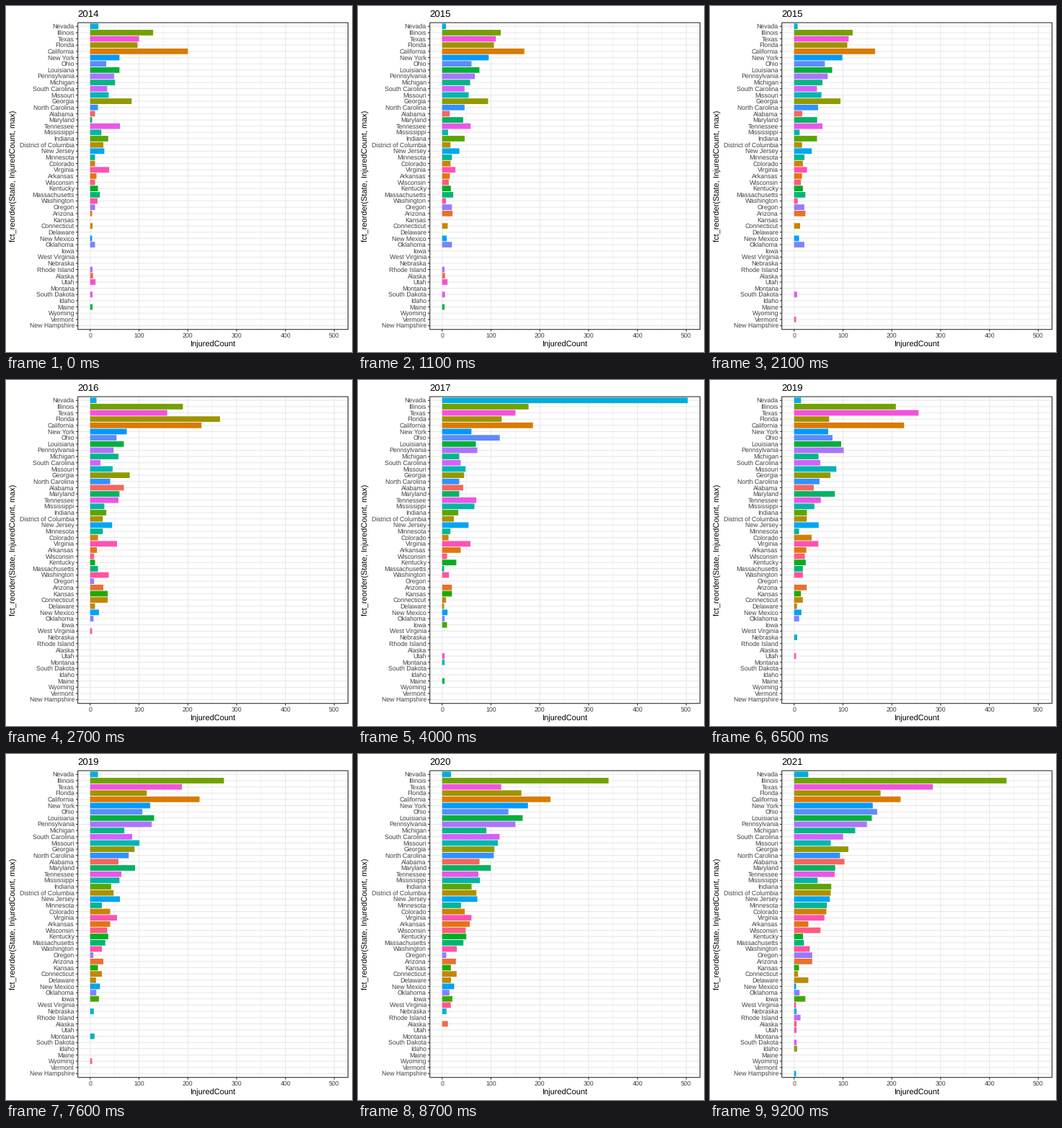
A matplotlib script that plays this animation: 480 by 480 pixels, repeating every 10000 ms.

```python
import numpy as np
import matplotlib.pyplot as plt
from matplotlib.animation import FuncAnimation
from matplotlib.patches import Rectangle

plt.rcParams.update({"font.family": "Liberation Sans", "text.hinting": "none"})

SIZE, DPI = 480, 72
FRAMES, STEP_MS = 100, 100
LEFT, RIGHT, TOP, BOTTOM = 99.7, 474.5, 23.1, 448.7
FIRST_YEAR = 2014
# (first changing tick, number of steps) for each move to the next year
MOVES = [(7, 7), (21, 7), (35, 6), (48, 6), (61, 6), (74, 6), (87, 6)]
GRID, INK, LABEL = "#e8e8e8", "#2b2b2b", "#404040"

names, rows = [], []


def state(name, *counts):
    """Add one bar: injured counts for 2014 to 2021, 0 where no data."""
    names.append(name)
    rows.append(counts)


state("Nevada", 17, 7, 13, 503, 19, 14, 18, 29)
state("Illinois", 129, 119, 190, 177, 168, 209, 339, 435)
state("Texas", 100, 111, 158, 150, 86, 258, 118, 284)
state("Florida", 97, 107, 266, 122, 161, 70, 162, 177)
state("California", 200, 165, 228, 186, 181, 226, 222, 218)
state("New York", 60, 99, 75, 60, 58, 70, 176, 161)
state("Ohio", 33, 63, 54, 118, 54, 79, 135, 170)
state("Louisiana", 60, 78, 69, 69, 64, 97, 165, 159)
state("Pennsylvania", 49, 69, 48, 72, 85, 102, 150, 149)
state("Michigan", 51, 58, 58, 35, 38, 50, 90, 125)
state("South Carolina", 35, 47, 21, 38, 24, 54, 118, 100)
state("Missouri", 38, 56, 46, 48, 57, 87, 115, 75)
state("Georgia", 85, 95, 81, 45, 36, 75, 107, 111)
state("North Carolina", 16, 49, 41, 35, 46, 52, 106, 94)
state("Alabama", 10, 16, 69, 43, 48, 40, 76, 103)
state("Maryland", 4, 47, 60, 35, 43, 84, 100, 84)
state("Tennessee", 61, 58, 58, 70, 82, 54, 74, 83)
state("Mississippi", 23, 11, 29, 66, 13, 42, 78, 48)
state("Indiana", 37, 47, 33, 33, 24, 26, 60, 76)
state("District of Columbia", 27, 16, 26, 24, 17, 26, 70, 75)
state("New Jersey", 29, 36, 45, 54, 58, 50, 72, 73)
state("Minnesota", 10, 21, 26, 17, 14, 10, 38, 67)
state("Colorado", 10, 18, 16, 13, 30, 36, 46, 66)
state("Virginia", 39, 26, 55, 58, 20, 50, 60, 62)
state("Arkansas", 13, 16, 14, 38, 20, 25, 57, 29)
state("Wisconsin", 10, 14, 8, 10, 17, 22, 48, 54)
state("Kentucky", 16, 18, 10, 29, 13, 24, 50, 18)
state("Massachusetts", 20, 23, 16, 4, 4, 18, 44, 20)
state("Washington", 15, 7, 38, 14, 13, 18, 30, 32)
state("Oregon", 10, 21, 8, 0, 0, 5, 8, 37)
state("Arizona", 4, 23, 27, 20, 10, 26, 28, 37)
state("Kansas", 0, 0, 36, 20, 13, 14, 18, 10)
state("Connecticut", 5, 12, 36, 8, 8, 18, 30, 8)
state("Delaware", 0, 0, 10, 4, 5, 6, 18, 29)
state("New Mexico", 4, 10, 18, 11, 10, 15, 25, 4)
state("Oklahoma", 10, 21, 7, 5, 22, 10, 15, 11)
state("Iowa", 0, 0, 0, 10, 0, 15, 21, 23)
state("West Virginia", 0, 0, 4, 0, 0, 0, 18, 4)
state("Nebraska", 0, 0, 0, 0, 17, 6, 9, 5)
state("Rhode Island", 5, 0, 0, 0, 0, 0, 0, 13)
state("Alaska", 6, 0, 0, 0, 0, 0, 12, 5)
state("Utah", 11, 0, 0, 5, 4, 0, 0, 5)
state("Montana", 0, 0, 0, 5, 0, 9, 0, 0)
state("South Dakota", 5, 6, 0, 0, 0, 0, 0, 5)
state("Idaho", 0, 0, 0, 0, 0, 0, 0, 6)
state("Maine", 5, 0, 0, 5, 0, 0, 0, 0)
state("Wyoming", 0, 0, 0, 0, 0, 4, 0, 0)
state("Vermont", 0, 4, 0, 0, 0, 0, 0, 0)
state("New Hampshire", 0, 0, 0, 0, 0, 0, 0, 4)

data = np.array(rows, float).T
count = len(names)
scale = (RIGHT - LEFT) / (1.1 * data.max())
zero = LEFT + 0.05 * data.max() * scale
pitch = (BOTTOM - TOP) / (count + 0.2)
row_y = TOP + pitch * (0.6 + np.arange(count))


def hue(deg, chroma=100, light=65):
    """Polar LUV colour as sRGB, slightly deepened."""
    h = np.radians(deg)
    u = chroma * np.cos(h) / (13 * light) + 0.1978
    v = chroma * np.sin(h) / (13 * light) + 0.4683
    y = ((light + 16) / 116) ** 3
    x = y * 9 * u / (4 * v)
    z = y * (12 - 3 * u - 20 * v) / (4 * v)
    lin = np.array([3.2406 * x - 1.5372 * y - 0.4986 * z,
                    -0.9689 * x + 1.8758 * y + 0.0415 * z,
                    0.0557 * x - 0.2040 * y + 1.0570 * z]).clip(0, 1)
    rgb = np.where(lin > 0.0031308, 1.055 * lin ** (1 / 2.4) - 0.055, 12.92 * lin)
    return tuple(rgb.clip(0, 1) ** 1.2)


def ease(p):
    return 4 * p ** 3 if p < 0.5 else 1 - 4 * (1 - p) ** 3


def pose(tick):
    """Year and bar values at a tick."""
    index = 0
    for i, (start, steps) in enumerate(MOVES):
        k = tick - start + 1
        if k >= steps:
            index = i + 1
        elif k > 0:
            a, b = data[i], data[i + 1]
            mixed = a + (b - a) * ease(k / steps)
            # bars without a partner pop in or out when the move ends
            values = np.where((a > 0) & (b > 0), mixed, a)
            return FIRST_YEAR + i + (2 * k > steps), values
    return FIRST_YEAR + index, data[index]


fig = plt.figure(figsize=(SIZE / DPI, SIZE / DPI), dpi=DPI, facecolor="white")
ax = fig.add_axes([0, 0, 1, 1])
ax.set(xlim=(0, SIZE), ylim=(SIZE, 0))
ax.axis("off")


def line(xs, ys, color, width=1.07, z=1):
    ax.plot(xs, ys, color=color, lw=width, zorder=z, snap=False,
            solid_capstyle="butt")


for n in range(50, 500, 100):
    line([zero + n * scale] * 2, [TOP, BOTTOM], GRID, 0.53)
for n in range(0, 501, 100):
    x = zero + n * scale
    line([x, x], [TOP, BOTTOM], GRID)
    line([x, x], [BOTTOM, BOTTOM + 2.75], INK)
    ax.text(x, 460, str(n), size=8.8, color=LABEL, ha="center", va="baseline")

order = sorted(names)
bars = []
for name, y in zip(names, row_y):
    line([LEFT, RIGHT], [y, y], GRID)
    line([LEFT - 2.75, LEFT], [y, y], INK)
    ax.text(94.9, y + 3.1, name, size=8.8, color=LABEL, ha="right", va="baseline")
    bar = Rectangle((zero, y - 0.45 * pitch), 0, 0.9 * pitch, lw=0, zorder=2,
                    color=hue(15 + 360 * order.index(name) / count), snap=False)
    bars.append(ax.add_patch(bar))

ax.add_patch(Rectangle((LEFT, TOP), RIGHT - LEFT, BOTTOM - TOP, fill=False,
                       ec=INK, lw=1.07, zorder=3, snap=False))
ax.text((LEFT + RIGHT) / 2, 473, "InjuredCount", size=11, ha="center", va="baseline")
ax.text(13.6, (TOP + BOTTOM) / 2, "fct_reorder(State, InjuredCount, max)", size=11,
        rotation=90, rotation_mode="anchor", ha="center", va="baseline")
title = ax.text(99.2, 15, "", size=13.2, va="baseline")


def draw(tick):
    year, values = pose(tick)
    title.set_text(str(year))
    for bar, value in zip(bars, values):
        bar.set_width(value * scale)
        bar.set_visible(value > 0)
    return [title, *bars]


anim = FuncAnimation(fig, draw, frames=FRAMES, interval=STEP_MS, repeat=True,
                     repeat_delay=0, blit=False)
plt.show()
```
